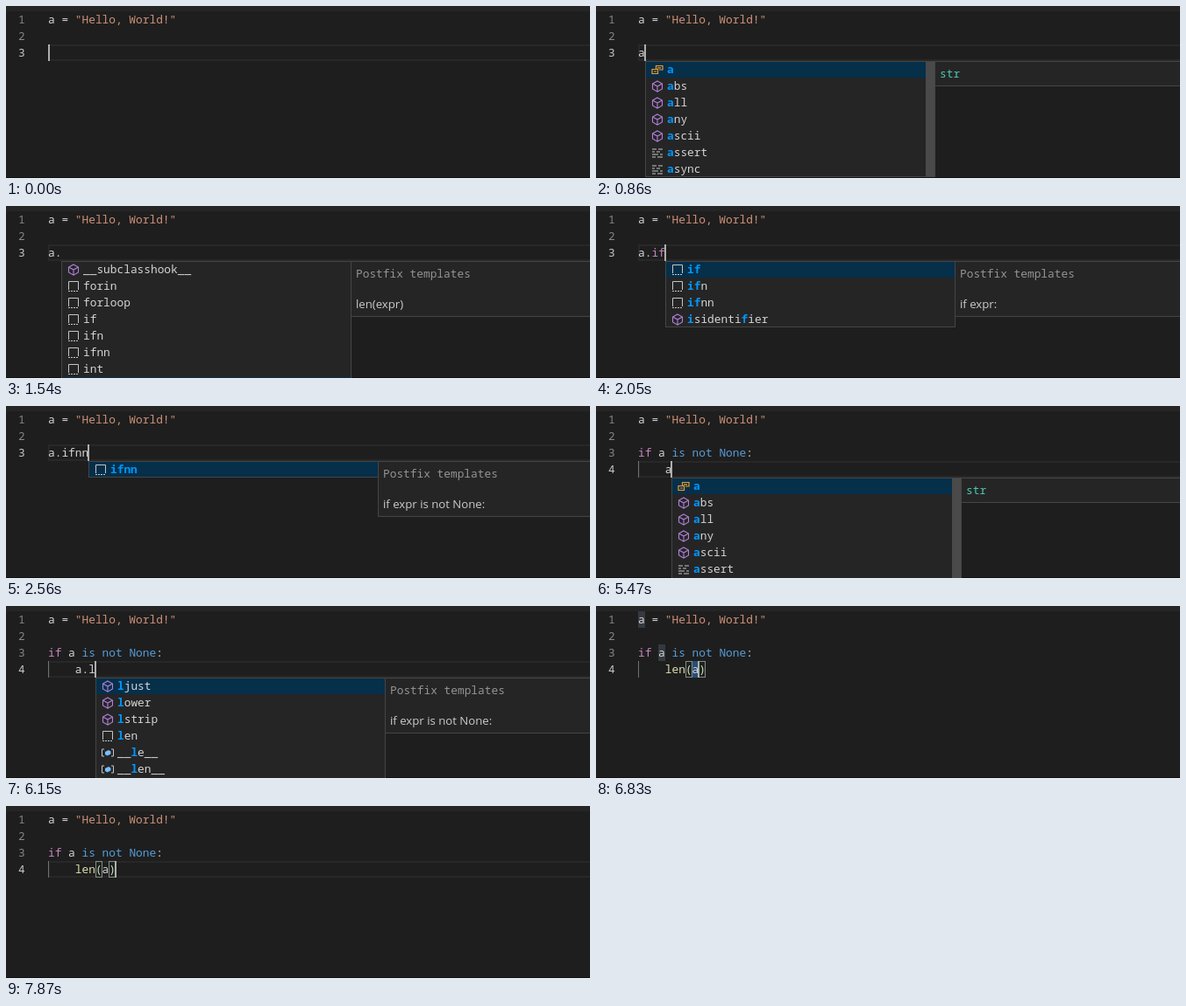
These frames come from a looping animation (666x197 px, 8000 ms). An HTML page:

```html
<!DOCTYPE html>
<html lang="en">
<head>
<meta charset="utf-8">
<title>Postfix completion</title>
<style>
  html, body { margin: 0; width: 100%; height: 100%; overflow: hidden; background: #1e1e1e; }
  #stage {
    position: relative; width: 666px; height: 197px; overflow: hidden;
    background: #1e1e1e; color: #d4d4d4; white-space: pre;
    font: 12.83px/19px "Noto Sans Mono", "DejaVu Sans Mono", monospace;
    font-variant-ligatures: none;
  }
  #stage div, #stage svg { position: absolute; box-sizing: border-box; }
  .strip { left: 0; top: 0; width: 666px; height: 6px; background: #252526; }
  .foot { left: 0; top: 196px; width: 666px; height: 1px; background: #111; }
  .num { left: 14px; color: #858585; }
  .num.on { color: #c6c6c6; }
  .current { left: 48px; width: 622px; height: 19px; border: 2px solid #282828; border-right: 0; }
  .guide { left: 48px; top: 63px; width: 1px; height: 19px; background: #707070; }
  .cursor { width: 2px; height: 19px; background: #aeafad; }
  .mark { height: 19px; width: 7.7px; }
  .pick { background: #264f78; }
  .same { background: #add6ff26; }
  .pair { width: 8px; border: 1px solid #888; background: #0064001a; }
  .str { color: #ce9178; }
  .ctl { color: #c586c0; }
  .kw { color: #569cd6; }
  .fn { color: #dcdcaa; }
  .list, .doc { background: #252526; border: 1px solid #454545; overflow: hidden; }
  .list { width: 331px; }
  .row { left: -1px; width: 331px; height: 19px; }
  .row.sel { background: #062f4a; }
  .row div { left: 25px; }
  .row svg { left: 7px; top: 3px; width: 14px; height: 14px; fill: none; }
  .row b { color: #0097fb; }
  .bar { right: -1px; top: -1px; width: 11px; height: 200px; background: #4a4a4a; }
  .doc { width: 400px; }
  .doc div { left: 5px; }
  .doc .title { top: 4px; color: #949494; }
  .doc .body { top: 39px; color: #ccc; font: 13.2px/19px "Open Sans", "Noto Sans", sans-serif; }
  .doc .type { top: 4px; color: #4ec9b0; }
</style>
</head>
<body>
<div id="stage"></div>
<script>
const LOOP = 8000, LEFT = 48, TOP = 6, CHAR = 7.697, LINE = 19;
const stage = document.getElementById('stage');

const ICONS = {
  method: '<path d="M7 1L12.5 4V10L7 13.2L1.5 10V4ZM1.5 4L7 7L12.5 4M7 7V13" stroke="#b180d7" stroke-width="1.1"/>',
  snippet: '<path d="M1.5 11V1.5H12.5V11" stroke="#c5c5c5"/><path d="M1 12.5H13" stroke="#c5c5c5" stroke-dasharray="2 1"/>',
  local: '<path d="M5.5 7V2.5H13V7H9M1 6.5H7.5V11.5H1ZM7 4.8H11M3 9H6" stroke="#ee9d28" stroke-width="1.2"/>',
  word: '<path d="M1 3H6M8 3H13M1 6H4M6 6H10M1 9H8M10 9H13M1 12H5M7 12H13" stroke="#c5c5c5" stroke-width="1.1"/>',
  field: '<path d="M3 3H.5V11H3M11 3H13.5V11H11" stroke="#c5c5c5"/><path d="M4 6L8 4L10.5 5.5V8.5L6.5 10.5L4 9Z" fill="#75beff"/>'
};

// Item names carry an icon prefix where they are not methods.
const KIND = { '#': 'snippet', '@': 'local', '=': 'word', '%': 'field' };
const menu = (items, doc, extra) => ({ items: items.split(' '), doc, sel: 0, ...extra });
const names = '@a abs all any ascii =assert =async';
const notNone = 'if expr is not None:', lenDoc = 'len(expr)';
const cond = 'if a is not None:', pad = '    ';

const menus = {
  a: menu(names, ':str', { bar: true }),
  aList: menu(names),
  dot: menu('__subclasshook__ #forin #forloop #if #ifn #ifnn #int #len', lenDoc, { sel: 7 }),
  i: menu('index isalnum isalpha isascii isdecimal isdigit isidentifier', '', { q: 'i' }),
  if: menu('#if #ifn #ifnn isidentifier', 'if expr:', { q: 'if' }),
  ifn: menu('#ifn #ifnn', 'if expr is None:', { q: 'ifn' }),
  ifnn: menu('#ifnn', notNone, { q: 'ifnn' }),
  dot2: menu('__sizeof__ __str__ __subclasshook__ #forin #forloop #if #ifn #ifnn', notNone, { sel: 7 }),
  l: menu('ljust lower lstrip #len %__le__ %__len__ %__lt__', notNone, { q: 'l' }),
  le: menu('#len lower %__le__ %__len__', lenDoc, { q: 'le' }),
  len: menu('#len %__len__', lenDoc, { q: 'len' })
};
menus.a.q = menus.aList.q = 'a';

// Each step changes only the listed properties.
const steps = [
  [0, { l3: '', row: 2, col: 0, on: 1 }],
  [510, { on: 0 }],
  [680, { l3: 'a', col: 1, on: 1 }],
  [860, { menu: 'a' }],
  [1030, { l3: 'a.', col: 2, menu: 'dot' }],
  [1540, { on: 0 }],
  [1880, { l3: 'a.i', col: 3, on: 1, menu: 'i' }],
  [2050, { l3: 'a.if', col: 4, menu: 'if' }],
  [2390, { l3: 'a.ifn', col: 5, menu: 'ifn' }],
  [2560, { l3: 'a.ifnn', col: 6, menu: 'ifnn' }],
  [3080, { l3: cond, l4: '', col: 4, menu: '', marks: [['same', 0, 0], ['pick', 2, 3]] }],
  [3580, { on: 0 }],
  [3920, { row: 3, col: 4, on: 1, marks: [] }],
  [4440, { on: 0 }],
  [4950, { on: 1 }],
  [5300, { l4: pad + 'a', col: 5, menu: 'aList', guide: 1 }],
  [5470, { menu: 'a' }],
  [5810, { l4: pad + 'a.', col: 6, menu: 'dot2' }],
  [6150, { l4: pad + 'a.l', col: 7, menu: 'l' }],
  [6320, { l4: pad + 'a.le', col: 8, menu: 'le' }],
  [6490, { l4: pad + 'a.len', col: 9, menu: 'len' }],
  [6830, { l4: pad + 'len(a)', col: 9, menu: '',
    marks: [['same', 0, 0], ['same', 2, 3], ['pick', 3, 8], ['pair', 3, 7], ['pair', 3, 9]] }],
  [7350, { on: 0 }],
  [7870, { col: 10, on: 1, marks: [['pair', 3, 7], ['pair', 3, 9]] }]
];

let last = { marks: [], menu: '' };
const states = steps.map(([time, change]) => (last = { ...last, ...change, time }));

const lineY = row => TOP + row * LINE;
const colX = col => Math.round(LEFT + col * CHAR);
const box = (cls, style, html = '') => `<div class="${cls}" style="${style}">${html}</div>`;
const at = (x, y) => `left:${x}px;top:${y}px`;

function paint(code) {
  const rules = /("[^"]*")|\b(if)\b|\b(is|not|None)\b|(len)(?=\()/g;
  return code.replace(rules, (m, str, ctl, kw) =>
    `<span class="${str ? 'str' : ctl ? 'ctl' : kw ? 'kw' : 'fn'}">${m}</span>`);
}

function match(name, query = '') {
  let k = 0;
  return [...name].map(c => c === query[k] ? (k++, `<b>${c}</b>`) : c).join('');
}

function drawMenu({ items, doc, sel, q, bar }, x, y) {
  const rows = items.map((item, i) => {
    const kind = KIND[item[0]];
    const name = kind ? item.slice(1) : item;
    const icon = `<svg viewBox="0 0 14 14">${ICONS[kind || 'method']}</svg>`;
    return box(i === sel ? 'row sel' : 'row', `top:${i * LINE - 1}px`, icon + box('', '', match(name, q)));
  }).join('');
  let html = box('list', `${at(x, y)};height:${items.length * LINE}px`,
    rows + (bar ? box('bar', '') : ''));
  if (doc) {
    const type = doc[0] === ':';
    html += box('doc', `${at(x + 330, y)};height:${type ? 29 : 64}px`, type
      ? box('type', '', doc.slice(1))
      : box('title', '', 'Postfix templates') + box('body', '', doc));
  }
  return html;
}

function draw(s) {
  const lines = ['a = "Hello, World!"', '', s.l3];
  if (s.l4 !== undefined) lines.push(s.l4);
  const picked = s.marks.some(m => m[0] === 'pick');
  let html = box('strip', '') + box('foot', '');
  if (!picked) html += box('current', `top:${lineY(s.row)}px`);
  if (s.guide) html += box('guide', '');
  for (const [cls, row, col] of s.marks)
    html += box('mark ' + cls, at(cls === 'pair' ? colX(col) : LEFT + col * CHAR, lineY(row)));
  lines.forEach((code, row) => {
    html += box(row === s.row || (picked && row === s.row) ? 'num on' : 'num', `top:${lineY(row)}px`, row + 1);
    html += box('', at(LEFT, lineY(row)), paint(code));
  });
  if (s.menu) html += drawMenu(menus[s.menu], colX(s.col), lineY(s.row + 1));
  if (s.on) html += box('cursor', at(Math.max(LEFT, colX(s.col) - 1), lineY(s.row)));
  stage.innerHTML = html;
}

let shown;
function tick() {
  const time = performance.now() % LOOP;
  const state = states.findLast(s => s.time <= time);
  if (state !== shown) draw(shown = state);
  requestAnimationFrame(tick);
}
tick();
</script>
</body>
</html>
```
